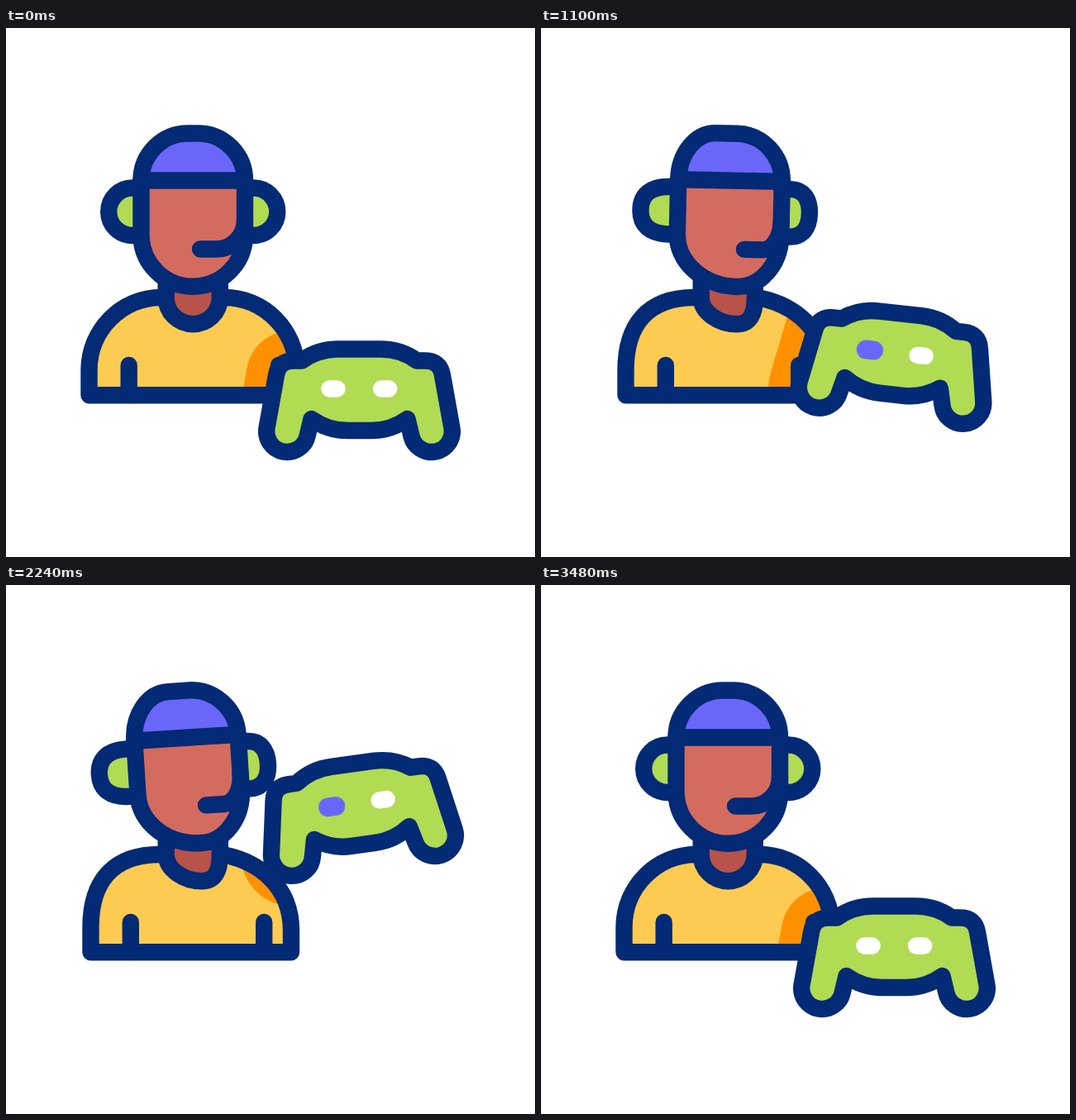
Animation, 640 px wide and 640 px high, one loop 3600 ms. Source, as an HTML page without scripts:

```html
<!DOCTYPE html>
<html lang="en">
<head>
<meta charset="utf-8">
<title>Gamer</title>
<style>
html, body { margin: 0; width: 100%; height: 100%; overflow: hidden; background: #fff; }
svg { display: block; width: 100%; height: 100%; }

.line { fill: none; stroke: #032a75; stroke-width: 20.4; stroke-linecap: round; stroke-linejoin: round; }
.skin { fill: #d46b5f; }
.neck { fill: #b85349; stroke-linecap: butt; }
.cap { fill: #6b66fa; }
.green { fill: #b1db52; }
.shirt { fill: #fdcb52; }
.shade { fill: #ff9100; stroke: #ff9100; stroke-width: 73; stroke-linejoin: round; }
.button { stroke: #fff; stroke-width: 20.4; stroke-linecap: round; }
.lit { stroke: #6b66fa; stroke-width: 23; stroke-linecap: round; }

.turn, .head, .pad {
  animation: turn 3.6s cubic-bezier(.333, 0, .667, 1) infinite;
}
.turn { d: var(--front); }
.body {
  --front: path('M188 326C139.5 326 100.5 365.5 100.5 414V444.2H351.5V414C351.5 365.5 312.5 326 264 326');
  --side: path('M186 326C128 326 102.5 360 102.5 414V444.2H345V418C345 364 306 335 264 326.5');
}
.head { transform-origin: 226px 313px; animation-name: nod; }
.pad { transform-origin: 427.5px 452px; animation-name: lift, tilt; }
.glow { animation: power 3.6s step-end infinite; }
.lit { animation: blink 1.2s step-end infinite; }
.lit.left { animation-delay: -.6s; }

@keyframes turn {
  0%, 91.67%, 100% { d: var(--front); }
  16.67%, 75% { d: var(--side); }
}
@keyframes nod {
  0%, 91.67%, 100% { rotate: 0deg; }
  21.11% { rotate: -4.2deg; }
  42.22% { rotate: 8.6deg; }
  65.28% { rotate: -4.3deg; }
}
@keyframes lift {
  0%, 96.67%, 100% { translate: 0 0; }
  20% { translate: 0 -172px; }
  40.56% { translate: 0 74px; }
  63.2% { translate: 0 -174px; }
  90.69% { translate: 0 14px; }
}
@keyframes tilt {
  0%, 94.44%, 100% { rotate: 0deg; }
  17.78% { rotate: -8deg; }
  32.5% { rotate: 7deg; animation-timing-function: cubic-bezier(.4, 0, .7, .6); }
  43.89% { rotate: 4.5deg; animation-timing-function: cubic-bezier(.4, .3, .6, 1); }
  63.89% { rotate: -8deg; }
  80.56% { rotate: 6deg; }
}
@keyframes power {
  0%, 95% { opacity: 0; }
  1.67% { opacity: 1; }
}
@keyframes blink {
  0% { opacity: 1; }
  50%, 100% { opacity: 0; }
}
</style>
</head>
<body>
<svg viewBox="0 0 640 640">
  <defs>
    <clipPath id="torso"><path class="turn body"/></clipPath>
    <path id="shell" d="M402 388.5H453Q478 388.5 497 402.5H507Q525 402.5 528 420L539.3 483A25 25 0 0 1 490.3 493L485.5 473Q466 487 442 487H413Q389 487 369.5 473L364.7 493A25 25 0 0 1 315.7 483L327 420Q330 402.5 348 402.5H358Q377 388.5 402 388.5Z"/>
  </defs>

  <path class="turn body shirt"/>
  <g clip-path="url(#torso)">
    <g class="pad"><use href="#shell" class="shade"/></g>
  </g>
  <path class="turn body line"/>
  <path class="turn line" style="--front:path('M148.7 408V444');--side:path('M150.8 408V444')"/>
  <path class="turn line" style="--front:path('M330 408V444');--side:path('M312.2 408V444')"/>
  <path class="turn line neck" style="
    --front:path('M193.7 290V326C193.7 344 208.2 358.2 226.2 358.2C244.2 358.2 258.8 344 258.8 326V290');
    --side:path('M193.7 290V326C193.7 344 215 358.2 237 358.2C253 358.2 258.8 346 258.8 326V290')"/>

  <g class="head">
    <path class="turn line green" style="
      --front:path('M163 193.5H153C137 193.5 124.2 206.4 124.2 222.2C124.2 238 137 251 153 251H163');
      --side:path('M163 193.5H153C130 193.5 118.5 204 118.5 222.2C118.5 240.4 130 251 153 251H163')"/>
    <path class="turn line green" style="
      --front:path('M289 193.5H299.5C315.5 193.5 328.3 206.4 328.3 222.2C328.3 238 315.5 251 299.5 251H289');
      --side:path('M289 193.5H300C315 193.5 323 205 323 222.2C323 239.4 315 251 300 251H289')"/>
    <path class="turn line skin" style="
      --front:path('M163.5 184.5V250A62.75 62.75 0 0 0 226.25 312.75A62.75 62.75 0 0 0 289 250V184.5');
      --side:path('M163.5 184.5V250A73.5 62.75 0 0 0 237 312.75A52 62.75 0 0 0 289 250V184.5')"/>
    <path class="turn line cap" style="
      --front:path('M163.5 184.5A56.5 57 0 0 1 220 127.5H232.5A56.5 57 0 0 1 289 184.5Z');
      --side:path('M163.5 184.5A44 57 0 0 1 207.5 127.5H233A56 57 0 0 1 289 184.5Z')"/>
    <path class="turn line" style="
      --front:path('M235 267.5H254A35 35 0 0 0 289 232.5');
      --side:path('M245 267.5H267A22 35 0 0 0 289 232.5')"/>
  </g>

  <g class="pad">
    <use href="#shell" class="line green"/>
    <path class="button" d="M391.4 436.5H400.6M454 436.5H463.2"/>
    <g class="glow">
      <path class="lit left" d="M391.4 436.5H400.6"/>
      <path class="lit" d="M454 436.5H463.2"/>
    </g>
  </g>
</svg>
</body>
</html>
```
